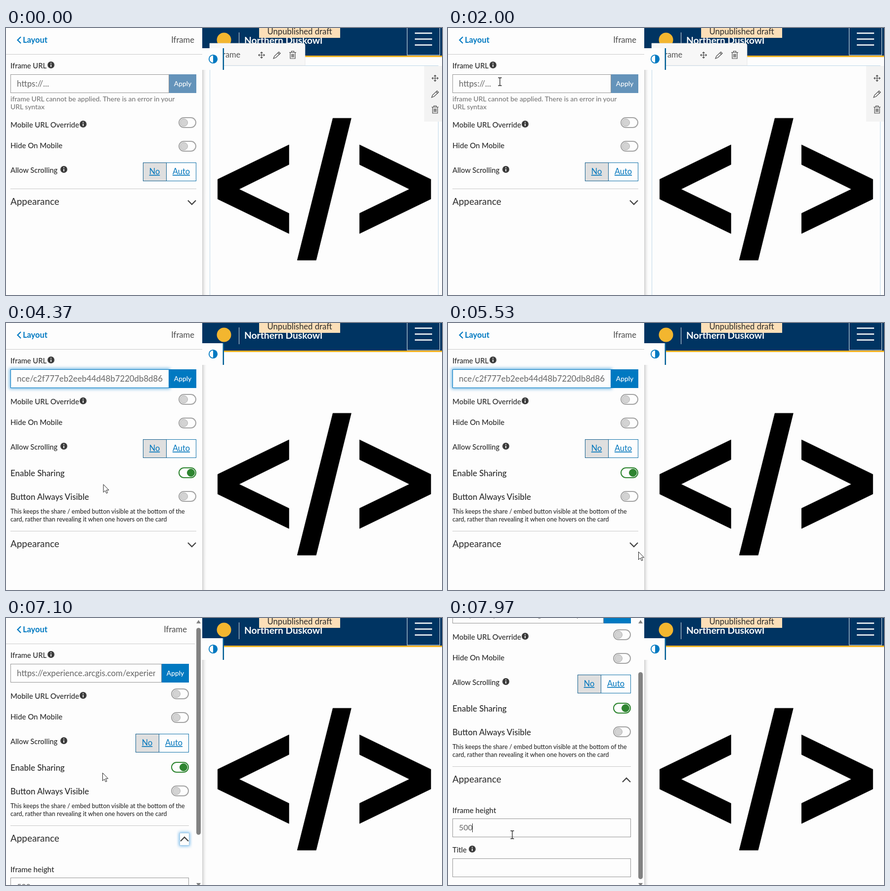
An HTML page for the animation above (8000 ms loop, 882 px wide and 542 px high).

```html
<!DOCTYPE html>
<html lang="en">
<head>
<meta charset="utf-8">
<title>Iframe card settings</title>
<style>
html, body { margin: 0; width: 100%; height: 100%; overflow: hidden; background: #fdfdfd; }
svg { display: block; width: 882px; height: 542px; font-family: Lato, "Open Sans", sans-serif; fill: #2b2b2b; }
#menu { font-family: "Open Sans", "Noto Sans", sans-serif; fill: #fff; }
.mid { text-anchor: middle; }
.end { text-anchor: end; }
.bold { font-weight: 700; }
.med { font-weight: 500; }
.link { fill: #0076bd; text-decoration: underline; }
.line { fill: none; stroke: #484848; stroke-width: 1.2; }
.off { opacity: .42; }
</style>
</head>
<body>
<script>
const LOOP = 8000;
const OPEN_MENU = 2400, FOCUS = 2100, CLOSE_MENU = 4000, PASTE = 4060, EXPAND = 6030, FOCUS_HEIGHT = 7900;
const URL_TEXT = 'https://experience.arcgis.com/experience/c2f777eb2eeb44d48b7220db8d86';
const PAPER = '#fdfdfd', BLUE = '#0079c1', GREEN = '#2e8530';

// Pointer path: time, x, y
const POINTER = [
  [100, 882, 330], [830, 420, 250], [870, 420, 250], [1170, 105, 109], [2000, 105, 109], [2380, 104, 108],
  [3000, 104, 108], [3430, 155, 286], [4100, 155, 286], [4730, 260, 390], [5170, 260, 390], [5530, 385, 464],
  [5900, 374, 451], [6150, 374, 451], [6770, 197, 318], [7100, 195, 314], [7300, 193, 307], [7600, 136, 425],
  [7850, 130, 440]
];

const text = (x, y, size, str, cls = '', more = '') =>
  `<text x="${x}" y="${y}" font-size="${size}" class="${cls}" ${more}>${str}</text>`;
const rect = (x, y, w, h, more = '') => `<rect x="${x}" y="${y}" width="${w}" height="${h}" ${more}/>`;
const path = (d, more = '') => `<path d="${d}" ${more}/>`;
const icon = (name, x, y) => `<use href="#${name}" x="${x}" y="${y}"/>`;
const toggle = (y, on) => rect(350, y - 10, 34, 20,
  `rx="10" fill="${PAPER}" stroke="${on ? GREEN : '#a3a3a3'}" stroke-width="2"`) +
  `<circle cx="${on ? 374 : 360}" cy="${y}" r="7.5" fill="${on ? GREEN : '#d3d3d3'}" stroke="${on ? GREEN : '#b2b2b2'}"/>`;
const field = (y, w, id) => rect(9.5, y + .5, w, 37, `id="${id}" fill="${PAPER}" stroke="#959595"`);

// Context menu rows: centre y, label, shortcut, disabled
const ITEMS = [
  [126, 'Emoji', 'Win+Period'], [163, 'Undo', 'Ctrl+Z'], [200, 'Cut', 'Ctrl+X', 1], [232, 'Copy', 'Ctrl+C', 1],
  [264, 'Paste', 'Ctrl+V'], [296, 'Paste as plain text', 'Ctrl+Shift+V'], [328, 'Select all', 'Ctrl+A', 1],
  [365, 'Writing direction'], [402, 'More tools'], [439, 'Inspect']
];
const menuRow = ([y, label, keys, off]) =>
  text(117, y + 5, 13.4, label, off ? 'off' : '') +
  (keys ? text(331, y + 5, 11.6, keys, 'end', `id="k${y}" opacity="${off ? .42 : .7}"`) : '') +
  (y === 365 || y === 402 ? path(`M347.5 ${y - 4}l5 4-5 4z`, 'fill="#b5b5b5"') : '');

const defs = `<defs>
  <g id="move" class="line"><path d="M-6 0H6M0-6V6M-4-2.2L-6.2 0-4 2.2M4-2.2L6.2 0 4 2.2M-2.2-4L0-6.2 2.2-4M-2.2 4L0 6.2 2.2 4"/></g>
  <g id="pencil" class="line"><path d="M-7 7L-5 2 4-6.500 7-3.500-2 5ZM2-4.500L5-1.500"/></g>
  <g id="trash" class="line"><path d="M-7-5H7M-2.500-5V-7.500H2.500V-5M-5-5V7.500H5V-5M-2-2V5M0-2V5M2-2V5"/></g>
  <g id="info"><circle r="7" fill="#3c3c3c"/><path d="M0-4.200V-2.400M0-.8V4" fill="none" stroke="${PAPER}" stroke-width="1.800"/></g>
  <linearGradient id="edge"><stop stop-color="#cfcfcf"/><stop offset="1" stop-color="${PAPER}" stop-opacity="0"/></linearGradient>
  <filter id="blur" x="-20%" y="-40%" width="140%" height="180%"><feGaussianBlur stdDeviation="3"/></filter>
  <filter id="soft" x="-20%" y="-20%" width="140%" height="140%"><feGaussianBlur stdDeviation="9"/></filter>
  <clipPath id="panelClip">${rect(0, 0, 397, 542)}</clipPath>
  <clipPath id="urlClip">${rect(22, 96, 295, 34, 'id="urlBox"')}</clipPath>
</defs>`;

const page =
  path('M572 237L428 307V347L572 417V376L471 327 572 277ZM715 237L859 307V347L715 417V376L816 327 715 277ZM661 183H698L627 471H589Z',
    'fill="#000" stroke="#000" stroke-width=".8" transform="translate(.3 .2)"') +
  rect(397, 0, 485, 56, 'fill="#003462"') + rect(397, 56, 485, 3, 'fill="#fcb424"') +
  '<circle cx="441" cy="24" r="14.5" fill="#f3b62f"/>' +
  path('M471.5 9V43', 'stroke="#dfe2e6"') +
  text(482, 32, 19.2, 'Northern Duskowl', 'bold', `fill="${PAPER}"`) +
  rect(512, 0, 164, 20, 'fill="#fcdfb8"') + text(594, 13, 16.7, 'Unpublished draft', 'mid') +
  rect(811.5, -1, 66, 56, 'fill="none" stroke="#e6e9ee"') +
  path('M827 10.500H862M827 22.500H862M827 34.500H862', `stroke="${PAPER}" stroke-width="2.5"`) +
  '<g id="tools">' +
    path('M412.5 542V76.500H874.500V542', 'fill="none" stroke="#bfd8ea"') +
    path('M412 31H601Q605 31 605 35V76H412Z', 'fill="#f7f7f7" stroke="#e0e0e0" stroke-width=".7"') +
    text(428, 60, 16.4, 'Iframe', '', 'fill="#555"') +
    icon('move', 517, 55) + icon('pencil', 548, 55) + icon('trash', 580, 54.5) +
    rect(846, 77, 36, 113, 'fill="#f3f3f3"') +
    icon('move', 868, 102) + icon('pencil', 868, 134) + icon('trash', 868, 165.5) +
  '</g>' +
  rect(397, 59, 10, 483, 'fill="url(#edge)"') +
  rect(397, 41, 42, 44, `fill="${PAPER}"`) + rect(438.5, 41, 2.5, 44, 'fill="#005e95"') +
  `<circle cx="419" cy="63" r="8.2" fill="${PAPER}" stroke="${BLUE}" stroke-width="1.8"/>` +
  path('M419 55A8 8 0 0 1 419 71Z', `fill="${BLUE}"`);

const panel = `<g clip-path="url(#panelClip)">${rect(0, 0, 397, 542, `fill="${PAPER}"`)}<g id="scroll">` +
  path('M30 18L23.500 24.500 30 31', `fill="none" stroke="${BLUE}" stroke-width="2.2"`) +
  text(34, 30, 16.4, 'Layout', 'bold', `fill="${BLUE}"`) +
  `<g class="right">${text(381, 30, 16.6, 'Iframe', 'end', 'fill="#4a4a4a"')}</g>` +
  path('M0 53.500H397', 'stroke="#cbcbcb"') +
  text(9, 82, 14.7, 'Iframe URL', 'med') + icon('info', 91, 75) +
  rect(7, 92, 325, 42, 'id="glow" fill="#6fb6e4" filter="url(#blur)"') + field(94, 320, 'urlField') +
  `<g clip-path="url(#urlClip)">${text(22, 119, 16.8, '', '', 'id="url" fill="#666"')}</g>` +
  `<g class="right">${rect(330, 94, 55, 38, 'id="apply"')}${text(357.5, 118, 13.8, 'Apply', 'mid med', `fill="${PAPER}"`)}</g>` +
  `<g id="error" fill="#777">${text(9, 149, 13.9, 'iframe URL cannot be applied. There is an error in your', 'med')}` +
    text(9, 165, 13.9, 'URL syntax', 'med') + '</g>' +
  '<g id="rows">' +
    text(9, 165, 14.9, 'Mobile URL Override', 'med') + icon('info', 156, 158) +
    text(9, 207, 15, 'Hide On Mobile', 'med') +
    text(9, 257, 14.7, 'Allow Scrolling', 'med') + icon('info', 117, 250) +
    `<g class="right">${toggle(155)}${toggle(203)}` +
      rect(277.5, 236.5, 107, 37, `fill="${PAPER}" stroke="#1273ab"`) +
      rect(277.5, 236.5, 47, 37, 'fill="#dfdfdf" stroke="#135f8e"') +
      text(300.5, 260, 16.4, 'No', 'mid link') + text(354.5, 260, 16.4, 'Auto', 'mid link') + '</g></g>' +
  '<g id="sharing">' +
    text(9, 311, 16.9, 'Enable Sharing', 'med') + text(9, 359, 16.7, 'Button Always Visible', 'med') +
    text(9, 387, 12.5, 'This keeps the share / embed button visible at the bottom of the', 'med') +
    text(9, 403, 12.5, 'card, rather than revealing it when one hovers on the card', 'med') +
    `<g class="right">${toggle(304, true)}${toggle(352)}</g></g>` +
  '<g id="section">' + path('', 'id="rule" stroke="#c9c9c9"') +
    text(9, 455, 18.9, 'Appearance') +
    '<g class="right">' +
      `<g id="ring">${rect(365, 436, 22, 28, 'fill="#6fb6ea" filter="url(#blur)"')}${rect(366.5, 437.5, 19, 25, `fill="${PAPER}" stroke="#a3cbe8"`)}</g>` +
      path('', 'id="chevron" fill="none" stroke="#444" stroke-width="2.3"') + '</g></g>' +
  '<g id="details">' +
    text(9, 517, 15.1, 'Iframe height', 'med') + field(528, 360, 'height') +
    text(22, 552, 16, '500', '', 'fill="#666"') + path('M49.5 538V556', 'id="caret" stroke="#2b2b2b"') +
    text(9, 597, 14.7, 'Title', 'med') + icon('info', 49, 590) + field(609, 360, 'title') + '</g></g>' +
  `<g id="bar" fill="#828282">${rect(382, 0, 15, 542, `fill="${PAPER}"`)}` +
    path('M385 11L389.500 4 394 11ZM385 538H394L389.500 545Z') +
    rect(385, 0, 9, 420, 'id="thumb" rx="4.5"') + '</g></g>';

const menu = '<g id="menu">' +
  rect(100, 112, 269, 354, 'rx="9" fill="#000" opacity=".38" filter="url(#soft)"') +
  rect(102.5, 107.5, 264, 350, 'rx="8" fill="#4a4a4a" stroke="#5e5e5e"') +
  rect(107, 282, 255, 29, 'id="hover" rx="4" fill="#5e5e5e"') +
  path('M103 144.500H366M103 181.500H366M103 346.500H366M103 383.500H366M103 420.500H366', 'stroke="#666"') +
  ITEMS.map(menuRow).join('') + '</g>';

const cursor = '<g id="cursor">' +
  path('M.5.5V16.500L4 13 6.500 18.500 9 17.500 6.500 12H11.500Z', 'id="arrow" fill="#fff" stroke="#222"') +
  path('M-3.500-8H-1L0-7 1-8H3.500M0-7V7M-3.500 8H-1L0 7 1 8H3.500', 'id="beam" fill="none" stroke="#222" stroke-width="1.3"') + '</g>';

document.body.innerHTML = `<svg viewBox="0 0 882 542">${defs}${page}${panel}${menu}${cursor}</svg>`;

const $ = id => document.getElementById(id);
const set = (id, attrs) => Object.entries(attrs).forEach(([k, v]) => $(id).setAttribute(k, v));
const show = (id, on) => { $(id).style.display = on ? '' : 'none'; };
const shift = (el, x, y) => el.setAttribute('transform', `translate(${x} ${y})`);
const rightParts = document.querySelectorAll('.right');
const ease = (t, from, to) => {
  const u = Math.min(1, Math.max(0, (t - from) / (to - from)));
  return u * u * (3 - 2 * u);
};

function pointerAt(t) {
  let i = POINTER.findIndex(p => p[0] > t);
  if (i < 0) return POINTER[POINTER.length - 1].slice(1);
  i = Math.max(1, i);
  const [t0, x0, y0] = POINTER[i - 1], [t1, x1, y1] = POINTER[i];
  const k = ease(t, t0, t1);
  return [x0 + (x1 - x0) * k, y0 + (y1 - y0) * k];
}

function render(t) {
  const pasted = t >= PASTE, open = t >= EXPAND;
  const focus = t >= FOCUS && !open, menuOpen = t >= OPEN_MENU && t < CLOSE_MENU;
  const dx = open ? -15 : 0;
  const scroll = Math.round(100 * ease(t, 7088, 7290) + 21 * ease(t, 7400, 7550));

  show('tools', !pasted);
  show('error', !pasted);
  show('sharing', pasted);
  show('details', open);
  show('bar', open);
  show('ring', open && t < FOCUS_HEIGHT);
  show('caret', t >= FOCUS_HEIGHT);
  show('glow', focus);
  shift($('scroll'), 0, -scroll);
  shift($('rows'), 0, pasted ? 0 : 37);
  shift($('section'), 0, pasted ? 0 : -96);
  rightParts.forEach(el => shift(el, dx, 0));
  set('urlField', { width: 320 + dx, stroke: focus ? BLUE : '#959595' });
  set('urlBox', { width: 295 + dx });
  set('url', focus && pasted ? { x: 317, 'text-anchor': 'end' } : { x: 22, 'text-anchor': 'start' });
  $('url').textContent = pasted ? URL_TEXT : 'https://...';
  set('apply', { fill: pasted ? BLUE : '#6493ba' });
  set('rule', { d: `M9 422.5H${385 + dx}` });
  set('chevron', { d: open ? 'M368 454L376 446 384 454' : 'M368 446L376 454 384 446' });
  set('thumb', { y: 19.25 + .75 * scroll });

  const [x, y] = pointerAt(t);
  const hovered = ITEMS.find(([cy, , , off]) => !off && Math.abs(y - cy) < 16);
  show('menu', menuOpen);
  show('hover', hovered);
  if (hovered) set('hover', { y: hovered[0] - 14 });
  ITEMS.filter(([, , keys, off]) => keys && !off)
    .forEach(item => set('k' + item[0], { opacity: item === hovered ? 1 : .7 }));

  const inField = top => x > 9 && x < 330 + dx && y > top - scroll && y < top + 38 - scroll;
  const beam = !menuOpen && (inField(94) || open && inField(528));
  show('cursor', t >= POINTER[0][0]);
  show('beam', beam);
  show('arrow', !beam);
  shift($('cursor'), x, y);
}

function tick() {
  render(performance.now() % LOOP);
  requestAnimationFrame(tick);
}
tick();
</script>
</body>
</html>
```
